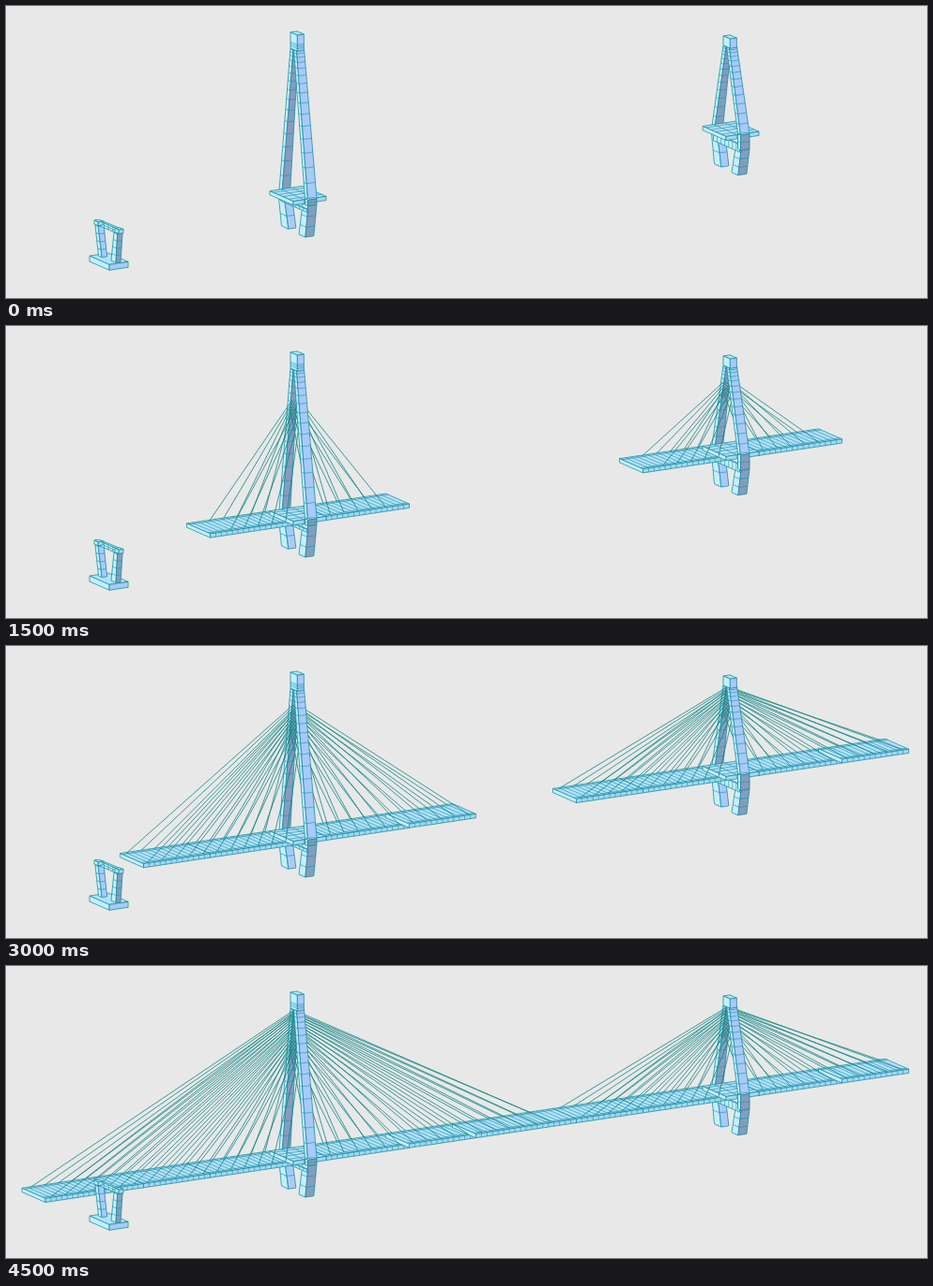
These frames come from a looping animation (981 by 312 pixels, 6.5 s). An HTML page:

```html
<!DOCTYPE html>
<html lang="en">
<head>
<meta charset="utf-8">
<title>Bridge construction stages</title>
<style>
html, body { margin: 0; width: 100%; height: 100%; overflow: hidden; background: #e8e8e8; }
svg { display: block; width: 981px; height: 312px; }
path { fill: none; stroke: #168c9c; stroke-width: .75; stroke-linejoin: round; }
.pale { fill: #c5effc; }
.top { fill: #b4e2fa; }
.side { fill: #a2d8f3; }
.blue { fill: #a8caf8; }
.dark { fill: #859cbf; }
.rib { stroke: #2492ac; stroke-width: .65; }
.cable { stroke: #128585; stroke-width: .8; }
</style>
</head>
<body>
<svg id="stage" viewBox="0 0 981 312"></svg>
<script>
const NS = 'http://www.w3.org/2000/svg';
const LOOP = 6500, FADE_STEPS = 6, STEP_MS = 100;
const STARTS = [1000, 2500, 4000];
const svg = document.getElementById('stage');

// Oblique projection: u runs along the deck, v across it, h straight down
const SLOPE = -0.1502, DECK_WIDTH = 27.3, DECK_THICK = 4.2;
const shift = ([x, y], u, v = 0, h = 0) => [x + u + v * .916, y + u * SLOPE + v * .403 + h];
const mix = (a, b, t) => a.map((value, i) => value + (b[i] - value) * t);
const fractions = (n, power = 1) => Array.from({ length: n - 1 }, (_, i) => ((i + 1) / n) ** power);

const add = (parent, tag) => parent.appendChild(document.createElementNS(NS, tag));
const trace = points => 'M' + points.map(p => p.map(n => n.toFixed(2)).join(' ')).join('L');
function draw(parent, className, d) {
  const path = add(parent, 'path');
  path.setAttribute('class', className);
  path.setAttribute('d', d);
}
const face = (parent, fill, ...points) => draw(parent, fill, trace(points) + 'Z');
const lines = (parent, className, list) => draw(parent, className, list.map(trace).join(''));

// Tapering post between two footprints {at, u, v}; cuts are fractions down its height
function post(parent, top, bottom, fill, cuts = []) {
  const edges = [top, bottom].map(({ at, u, v }) => [at, shift(at, 0, v), shift(at, u, v)]);
  const [[a, b, c], [d, e, f]] = edges;
  face(parent, 'pale', a, b, e, d);
  face(parent, fill, b, c, f, e);
  lines(parent, 'rib', cuts.map(t => [mix(a, d, t), mix(b, e, t), mix(c, f, t)]));
}
function box(parent, at, u, v, h, fill, cuts) {
  face(parent, 'top', at, shift(at, u), shift(at, u, v), shift(at, 0, v));
  post(parent, { at, u, v }, { at: shift(at, 0, 0, h), u, v }, fill, cuts);
}

// Layers from back to front
const [feet, farLegs, decks, cables, nearLegs, pier] = Array.from({ length: 6 }, () => add(svg, 'g'));

function fadingGroup(parent, start) {
  const g = add(parent, 'g');
  const frames = [{ offset: 0, opacity: 0, easing: 'step-end' }];
  for (let k = 0; k < FADE_STEPS; k++) {
    frames.push({ offset: (start + STEP_MS * k) / LOOP, opacity: (k + 1) / FADE_STEPS, easing: 'step-end' });
  }
  g.animate([...frames, { offset: 1, opacity: 1 }], { duration: LOOP, iterations: Infinity });
  return g;
}
const deckStages = STARTS.map(start => fadingGroup(decks, start));
const cableStages = STARTS.map(start => fadingGroup(cables, start));

const deckEdge = x => [x, 237.3 + SLOPE * (x - 17)];

function deck(parent, x0, x1, spacing, rails) {
  const at = deckEdge(x0), length = x1 - x0;
  box(parent, at, length, DECK_WIDTH, DECK_THICK, 'side');
  const ribs = fractions(Math.round(length / spacing)).map(t => [
    shift(at, length * t), shift(at, length * t, DECK_WIDTH), shift(at, length * t, DECK_WIDTH, DECK_THICK)
  ]);
  const along = rails.map(t => [shift(at, 0, DECK_WIDTH * t), shift(at, length, DECK_WIDTH * t)]);
  lines(parent, 'rib', ribs.concat(along));
}

const REACH = [17.5, 106, 177];
const stageOf = k => k < 5 ? 0 : k < 11 ? 1 : 2;

function tower({ middle, top, head, collar, foot, cuts, counts }) {
  const [x, y] = deckEdge(middle);
  const crown = [x + 4.5, top], joint = top + head;

  // Below the deck
  post(feet, { at: [x - 8, y + 10], u: 8, v: 7 }, { at: [x - 5, y + foot], u: 8, v: 8 }, 'blue', [.55]);
  post(feet, { at: [x + 17.5, y + 10 + collar], u: 9, v: 6.5 }, { at: [x + 13.5, y + foot + 9], u: 9, v: 7.5 }, 'dark', [.35, .68]);
  box(feet, [x - 6, y + 10], 1, 31, collar / 2, 'side', []);
  lines(feet, 'rib', fractions(7).map(t => [
    shift([x - 6, y + 10], 0, 31 * t), shift([x - 6, y + 10], 0, 31 * t, collar / 2)
  ]));

  // The two inclined legs and the head joining them
  const farTop = [x + 4.5, joint], farBase = [x - 7.5, y + 2];
  const nearTop = [x + 8, joint + 1], nearBase = [x + 20, y + 11];
  const levels = fractions(cuts, 1.8);
  post(farLegs, { at: farTop, u: 5.5, v: 3.3 }, { at: farBase, u: 8.5, v: 3.5 }, 'dark', levels);
  post(nearLegs, { at: nearTop, u: 8, v: 3.3 }, { at: nearBase, u: 9.5, v: 3.3 }, 'blue', levels);
  box(nearLegs, nearBase, 9.5, 3.3, collar, 'dark', [.5]);
  box(nearLegs, crown, 7, 8, head, 'blue', head > 12 ? [.6, .72, .84] : []);

  // Deck pieces on both sides, then the cables that hold them
  deck(decks, middle - REACH[0], middle + REACH[0], 12, [.15, .35, .55, .8]);
  for (let i = 1; i < REACH.length; i++) {
    deck(deckStages[i - 1], middle - REACH[i], middle - REACH[i - 1], 5.9, [.1, .9]);
    deck(deckStages[i - 1], middle + REACH[i - 1], middle + REACH[i], 5.9, [.1, .9]);
  }
  const onLeg = (from, to, level) => {
    const p = mix(from, to, (level - from[1]) / (to[1] - from[1]));
    return [p[0] + 4, p[1]];
  };
  counts.forEach((count, sideIndex) => {
    const last = counts[0] - 1, sets = STARTS.map(() => []);
    for (let k = 0; k < count; k++) {
      const level = joint + 2 + 2.65 * last * (1 - k / last) ** 1.15;
      const anchor = deckEdge(middle + (sideIndex ? 1 : -1) * (23.7 + 14.7 * k));
      sets[stageOf(k)].push(
        [onLeg(farTop, farBase, level), shift(anchor, 0, 1)],
        [onLeg(nearTop, nearBase, level), shift(anchor, 0, DECK_WIDTH - 2)]);
    }
    sets.forEach((set, i) => lines(cableStages[i], 'cable', set));
  });
}

tower({ middle: 298.5, top: 28, head: 17, collar: 6, foot: 40, cuts: 16, counts: [18, 17] });
tower({ middle: 759.5, top: 32, head: 10, collar: 16, foot: 43, cuts: 14, counts: [11, 11] });
deck(deckStages[2], 17, 121.5, 5.9, [.1, .9]);
deck(deckStages[2], 475.5, 582.5, 5.9, [.1, .9]);

// Side pier
box(pier, [89, 267], 20, 23, 6, 'blue');
post(pier, { at: [95, 234], u: 6, v: 3.5 }, { at: [98.5, 267], u: 5.5, v: 4 }, 'blue', fractions(4));
post(pier, { at: [115, 242], u: 5.5, v: 4 }, { at: [112, 272], u: 5, v: 5.5 }, 'dark', fractions(4));
box(pier, [100, 230], 3, 20, 5, 'side', [.5]);
lines(pier, 'rib', fractions(4).map(t => [shift([100, 230], 0, 20 * t), shift([100, 230], 0, 20 * t, 5)]));
[[94, 229], [116, 237.5]].forEach(at => box(pier, at, 5, 4.5, 4, 'side'));
</script>
</body>
</html>
```
